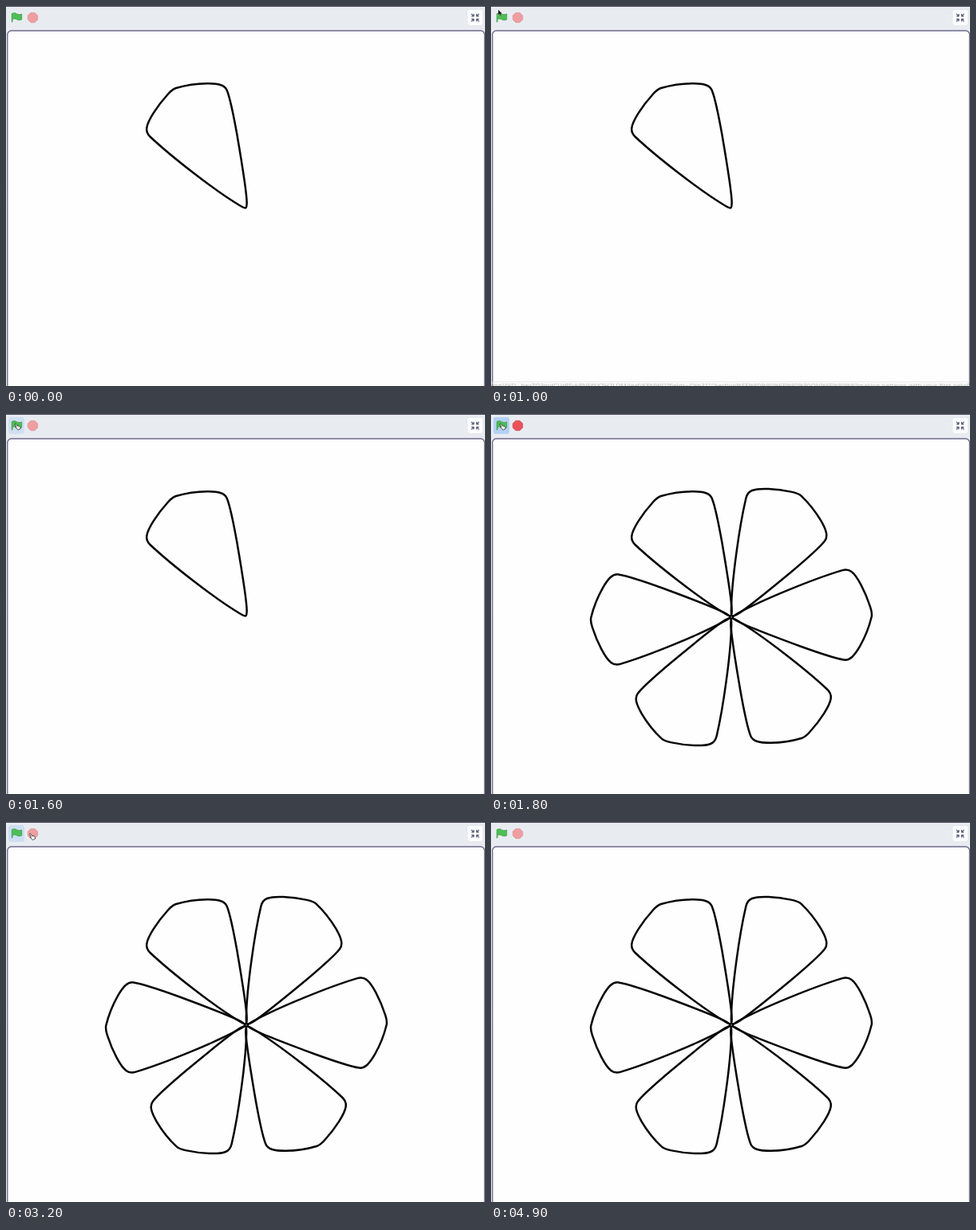
These frames come from a looping animation (600x477 px, 5000 ms). An HTML page:

```html
<!DOCTYPE html>
<html lang="en">
<head>
<meta charset="utf-8">
<title>Flower stage</title>
<style>
html, body { margin: 0; width: 100%; height: 100%; overflow: hidden; background: #e8ecf1; }
svg { display: block; width: 600px; height: 477px; }
text { font: 8px "Open Sans", sans-serif; fill: #555; white-space: pre; }
</style>
</head>
<body>
<svg viewBox="0 0 600 477" xmlns="http://www.w3.org/2000/svg">
  <defs>
    <path id="petal" d="M301.6 248C302.2 238 297 206 289.5 162C284.5 134 280 114 276.8 106
      C274 99 266 97.2 252 97.2C236 97.4 223 100 213 103C209 104.2 207 106 203 110.5
      C189 126 177.5 144 176.3 153C175.6 158 177.5 161.2 181 164.5
      C207 189 262 232 293 250.5C299.5 254.3 301.4 255.8 301.6 248Z"/>
  </defs>
  <path d="M0 .5H600" stroke="#4b4b60"/>
  <rect x="1.8" y="31" width="597.7" height="470" rx="5" fill="#fefefe" stroke="#6d6b8c" stroke-width="1.4"/>

  <rect id="glow" x="3" y="4" width="20" height="21" rx="3" fill="#4c97ff"/>
  <path d="M7.3 9.6C10 8.1 11.8 8.8 13.6 9.9C15.6 11.1 17.4 10.9 19.7 10V17
    C17.4 18 15.5 18 13.5 16.8C11.5 15.7 9.9 15.6 8 16.5V20H7.3Z"
    fill="#4cbf56" stroke="#45a049" stroke-width=".9" stroke-linejoin="round"/>
  <path id="stop" d="M30.9 8.4H36.1L39.7 12V17.1L36.1 20.7H30.9L27.3 17.1V12Z" stroke-width=".7" stroke-linejoin="round"/>

  <rect x="578" y="4.5" width="19.5" height="20" rx="3" fill="#fdfdfe" stroke="#dde1e8" stroke-width=".6"/>
  <g id="shrink" fill="none" stroke="#575e75" stroke-width="1.3" stroke-linecap="round" stroke-linejoin="round"></g>

  <g id="flower" fill="none" stroke="#050505" stroke-width="2.5" stroke-linejoin="round"></g>

  <g id="status">
    <rect x="-4" y="471.5" width="602" height="12" rx="2" fill="#f1f1f1" stroke="#cfcfcf" stroke-width=".8"/>
    <text x="-1" y="479">ting/4KD...bexTQ3mdCUrRSvkPNEfXX7H2LOM/leaf/KRMWQ?fields={"ab31":"section%EF%80%80%EF%80%80ON%EF%80%80making-patterns-with-your-first-petal"}</text>
  </g>

  <path id="arrow" d="M0 0V7.2L1.7 5.7L3 8.3L4.2 7.7L3 5.2H5.2Z" fill="#111" stroke="#fff" stroke-width=".3"/>
  <path id="hand" d="M0 .8C.3 -.1 1.4 -.1 1.8 .8L3 2.8L5.5 3.2C6.5 3.5 7 4.5 7.1 6.5L4.3 8L1.2 5.4C.7 4.7 1.2 4.2 2 4.6Z"
    fill="#fff" stroke="#222" stroke-width=".8" stroke-linejoin="round"/>
</svg>
<script>
const LOOP = 5000;
const el = id => document.getElementById(id);
const copies = (n, make) => Array.from({ length: n }, (_, i) => make(i)).join('');

el('flower').innerHTML = copies(6, i =>
  `<use href="#petal" transform="rotate(${i * 60} 301 255)"/>`);
el('shrink').innerHTML = copies(4, i =>
  `<path transform="rotate(${i * 90} 587.7 14.6)" d="M583.3 10.2L585.7 12.6M585.9 10.4V12.8H583.5"/>`);

// Rows are [time, ...values]; the last row reached holds.
const at = (rows, t) => rows.filter(r => r[0] <= t).pop().slice(1);

const pointer = [
  [0, '', 0, 0], [800, 'arrow', 5, -4], [1000, 'arrow', 9, 4.5],
  [1100, 'hand', 10, 10], [1200, 'hand', 11, 12],
  [2900, 'hand', 14, 13], [3000, 'hand', 21, 14], [3100, 'hand', 27, 15],
  [3200, 'hand', 29.5, 14.5], [3500, '', 0, 0]
];
const glow = [[0, 0], [1100, .08], [1200, .15], [1700, .15], [1800, .32], [2100, .24], [2200, .16], [3300, .08], [3400, 0]];
const status = [[0, 0], [1000, .4], [1100, 1], [1500, .5], [1600, 0]];
const running = [[0, 0], [1800, 1], [2100, .5], [2200, 0]];
const drawn = [[0, 1], [1800, 6]];

const mix = (a, b, k) => `rgb(${a.map((v, i) => Math.round(v + (b[i] - v) * k))})`;

function draw(t) {
  const [kind, x, y] = at(pointer, t);
  for (const id of ['arrow', 'hand']) {
    el(id).style.display = id === kind ? '' : 'none';
    el(id).setAttribute('transform', `translate(${x} ${y})`);
  }
  el('glow').style.opacity = at(glow, t)[0];
  el('status').style.opacity = at(status, t)[0];
  const on = at(running, t)[0];
  el('stop').style.fill = mix([238, 157, 160], [236, 82, 90], on);
  el('stop').style.stroke = mix([222, 146, 151], [200, 68, 78], on);
  const count = at(drawn, t)[0];
  [...el('flower').children].forEach((p, i) => p.style.display = i < count ? '' : 'none');
}

const start = performance.now();
function tick(now) {
  draw(Math.max(0, now - start) % LOOP);
  requestAnimationFrame(tick);
}
draw(0);
requestAnimationFrame(tick);
</script>
</body>
</html>
```
